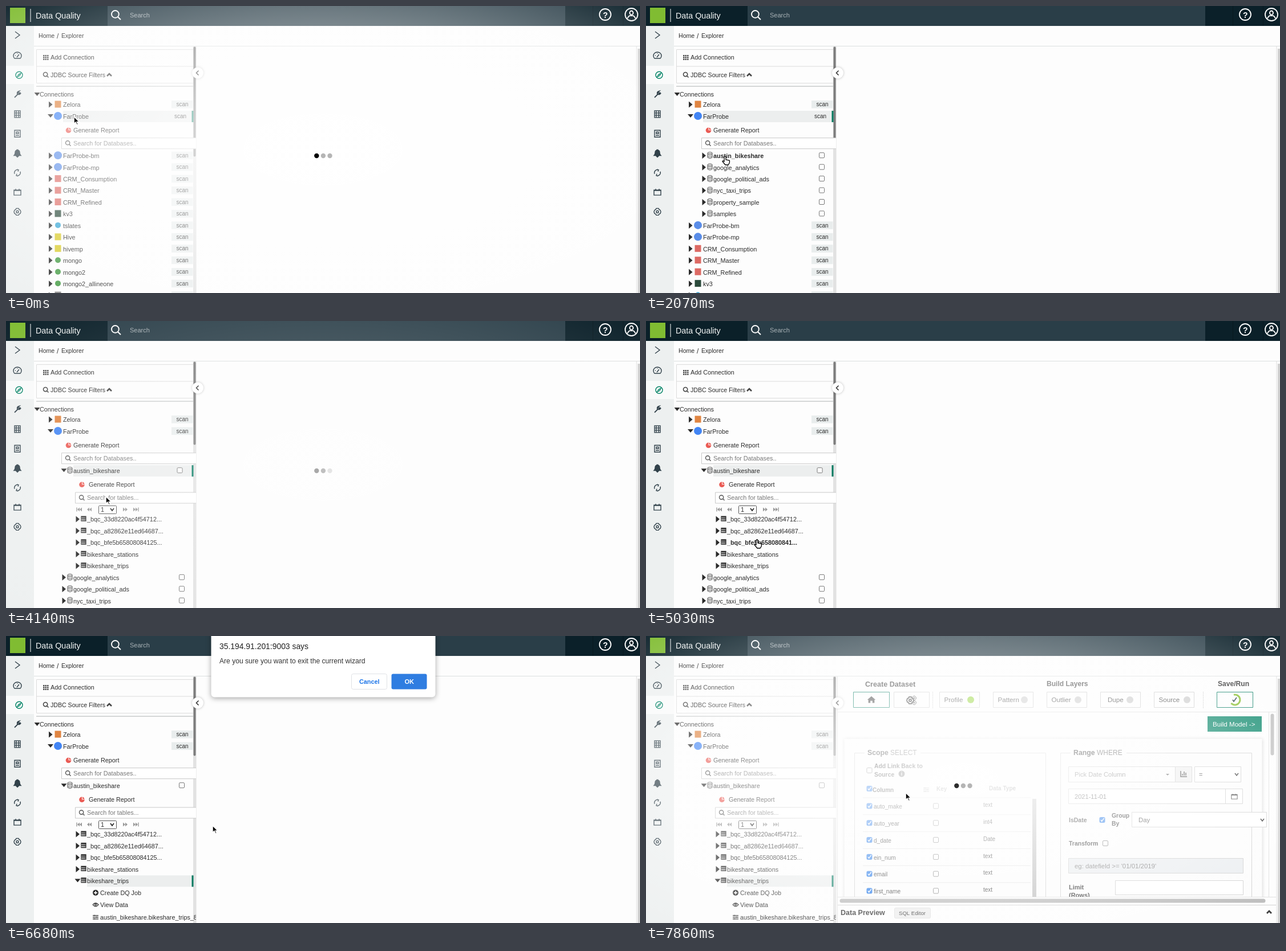
Write an HTML page with a canvas that moves like this. It is 1111x504 px and loops after 8 s.

```html
<!DOCTYPE html>
<html lang="en">
<head>
<meta charset="utf-8">
<title>Data Quality</title>
<style>
html, body { margin: 0; width: 100%; height: 100%; overflow: hidden; background: #fdfdfd; }
canvas { display: block; }
</style>
</head>
<body>
<canvas id="stage" width="1111" height="504"></canvas>
<script>
const g = document.getElementById('stage').getContext('2d');
const LOOP = 8000, TICK = 147.7, LAST = 53;
const FONT = '"Liberation Sans", Arial, sans-serif';
const INK = '#2b2b2b', GREEN = '#00795f', GREY = '#777';

// Moments of change, in ticks
const DBS = 3, OPEN_DB = 15, TABLES = 26, OPEN_TABLE = 39, ASK = 43, ASK_END = 52, WIZARD = 53;

const PATHS = {
  right: 'M-4-6L4 0L-4 6', left: 'M2-4L-2 0L2 4', up: 'M-4 2L0-2L4 2', down: 'M-3-2L0 2L3-2',
  search: 'M3-1A4 4 0 1 1-5-1A4 4 0 1 1 3-1M2 2L5 5',
  gauge: 'M-5 5A7 6.5 0 1 1 5 5ZM-1 3L3-2M-4 0H-3M0-4V-3',
  compass: 'M6 0A6 6 0 1 1-6 0A6 6 0 1 1 6 0M3-3L1 1L-3 3L-1-1Z',
  wrench: 'M-5 5L1-1M5-4L3-2L1-4L3-6Q-1-5 0-1Q4 1 6-3',
  grid: 'M-5-6H5V6H-5ZM-5-2H5M-5 2H5M-2-6V6M2-6V6',
  doc: 'M-5-6H5V6H-5ZM-2-3H2V0H-2ZM-3 3H3',
  bell: 'M-6 4Q-4 2-4-1Q-4-5-1-5V-6H1V-5Q4-5 4-1Q4 2 6 4ZM-2 5H2L0 7Z',
  refresh: 'M-5 2A5.5 5.5 0 0 1 2-5M-1-6L2-5L1-2M5-2A5.5 5.5 0 0 1-2 5M1 6L-2 5L-1 2',
  calendar: 'M-6-4H6V5H-6ZM-6-3H6M-3-6V-4M3-6V-4',
  gear: 'M2 0A2 2 0 1 1-2 0A2 2 0 1 1 2 0M-2-6H2L3-4L5-3L6 0L5 3L3 4L2 6H-2L-3 4L-5 3L-6 0L-5-3L-3-4Z',
  person: 'M3-2A3 3.5 0 1 1-3-2A3 3.5 0 1 1 3-2M-7 8Q-5 2 0 3Q5 2 7 8',
  db: 'M4-4A4 1.5 0 1 1-4-4A4 1.5 0 1 1 4-4V4Q0 7-4 4V-4M-4-1Q0 1 4-1M-4 2Q0 4 4 2',
  table: 'M-4-4H4V4H-4ZM-4-3H4M-4 0H4M-1-4V4M2-4V4',
  eye: 'M-5 0Q0-6 5 0Q0 6-5 0M1.5 0A1.5 1.5 0 1 1-1.5 0A1.5 1.5 0 1 1 1.5 0',
  sliders: 'M-5-3H5M-5 0H5M-5 3H5M-2-4V-2M2-1V1M-2 2V4',
  plus: 'M-3 0H3M0-3V3', tick: 'M-3 0L-1 3L4-4',
  home: 'M-8 0L0-7L8 0L6 0V6H2V2H-2V6H-6V0Z',
  chart: 'M-5-5V5H6M-2 3V0M1 3V-4M4 3V-2',
  arrow: 'M0 0V13L3 10L5.500 15L7.500 14L5.500 9.500H9.500Z',
  hand: 'M-1 0Q1-2 2 0V5L8 6Q9 7 8 11L6 14H1L-4 8Q-4 6-1 8Z',
};
for (const n in PATHS) PATHS[n] = new Path2D(PATHS[n]);

function icon(name, x, y, stroke = INK, width = 1.3, fill, scale = 1) {
  g.save();
  g.translate(x, y);
  g.scale(scale, scale);
  if (fill) { g.fillStyle = fill; g.fill(PATHS[name]); }
  if (stroke) { g.strokeStyle = stroke; g.lineWidth = width; g.stroke(PATHS[name]); }
  g.restore();
}
function rect(x, y, w, h, color) { g.fillStyle = color; g.fillRect(x, y, w, h); }
function frame(x, y, w, h, color, fill, r = 0) {
  g.beginPath();
  g.roundRect(x + .5, y + .5, w - 1, h - 1, r);
  if (fill) { g.fillStyle = fill; g.fill(); }
  if (color) { g.strokeStyle = color; g.lineWidth = 1; g.stroke(); }
}
function disc(x, y, r, fill, stroke, width = 1) {
  g.beginPath();
  g.arc(x, y, r, 0, 7);
  if (fill) { g.fillStyle = fill; g.fill(); }
  if (stroke) { g.strokeStyle = stroke; g.lineWidth = width; g.stroke(); }
}
function text(s, x, y, size = 10.8, color = INK, weight = '') {
  g.font = `${weight} ${size}px ${FONT}`;
  g.fillStyle = color;
  g.fillText(s, x, y + size * .36);
}
function poly(color, ...p) {
  g.fillStyle = color;
  g.beginPath();
  for (let i = 0; i < p.length; i += 2) g.lineTo(p[i], p[i + 1]);
  g.fill();
}
function check(x, y, on) {
  frame(x - 5, y - 5, 10, 10, on ? '#1a73e8' : GREY, on ? '#1a73e8' : '#fff', 1.5);
  if (on) icon('tick', x, y, '#fff', 1.8, null, .8);
}

const clamp = v => Math.max(0, Math.min(1, v));

// tick, x, y
const MOVES = [[0, 119, 194], [7, 119, 194], [14, 138, 265], [15, 138, 265], [22, 175, 308],
  [31, 175, 308], [34, 194, 385], [38, 176, 428], [39, 176, 428], [41, 205, 449], [42, 205, 449],
  [50, 701, 81], [51, 701, 81], [53, 455, 275]];
function pointer(k) {
  const i = Math.max(1, MOVES.findIndex(m => m[0] >= k));
  const [a, x, y] = MOVES[i - 1], [b, u, v] = MOVES[i];
  let f = (k - a) / (b - a);
  f = f * f * (3 - 2 * f);
  return [x + (u - x) * f, y + (v - y) * f];
}
function veil(k) {
  if (k < 15) return clamp((6 - k) / 3);
  if (k < 51) return clamp((29 - k) / 3);
  return [.2, .6, 1][k - 51];
}

const SOURCES = [
  ['FarProbe-bm', '#5a8de8', 7], ['FarProbe-mp', '#5a8de8', 7],
  ['CRM_Consumption', '#dd6a64'], ['CRM_Master', '#dd6a64'], ['CRM_Refined', '#dd6a64'],
  ['kv3', '#2b4a3b'], ['tslates', '#35a5d5', 5], ['Hive', '#d9cb2c'], ['hivemp', '#d9cb2c'],
  ['mongo', '#4b9f4b', 5], ['mongo2', '#4b9f4b', 5], ['mongo2_allineone', '#4b9f4b', 5], ['', '#888'],
];
const SCHEMAS = ['austin_bikeshare', 'google_analytics', 'google_political_ads', 'nyc_taxi_trips', 'property_sample', 'samples'];
const TABLE_NAMES = ['_bqc_33d8220ac4f54712...', '_bqc_a82862e11ed64687...', '_bqc_bfe5b65808084125...', 'bikeshare_stations', 'bikeshare_trips'];
const JOBS = [['plus', 'Create DQ Job', 21], ['eye', 'View Data', 22], ['sliders', 'austin_bikeshare.bikeshare_trips_8', 20]];

// Each row: kind, level, label, y, plus optional open / active / mark
function treeRows(k) {
  const rows = [];
  let y = 173.5;
  const add = (kind, level, label, step = 20.45, more) => { rows.push({ kind, level, label, y, ...more }); y += step; };
  add('source', 1, 'Zelora', 20.5, { mark: ['#e08542'] });
  add('source', 1, 'FarProbe', 24.3, { mark: ['#4285f4', 7], open: true, active: k < OPEN_DB });
  add('report', 2, 'Generate Report', 22.9);
  add('search', 2, 'Search for Databases..', 22);
  if (k >= DBS) SCHEMAS.forEach((name, i) => {
    const open = !i && k >= OPEN_DB;
    add('schema', 2, name, open ? 24.1 : 20.45, { open, active: open && k < OPEN_TABLE });
    if (!open) return;
    add('report', 3, 'Generate Report', k >= TABLES ? 23.2 : 20.3);
    if (k < TABLES) return;
    add('search', 3, 'Search for tables...', 20.5);
    add('pager', 3, '1', 17.6);
    TABLE_NAMES.forEach((t, j) => {
      const wide = j === 4 && k >= OPEN_TABLE;
      add('table', 3, t, 20.45, { open: wide, active: wide });
      if (wide) JOBS.forEach(([mark, label, step]) => add('job', 4, label, step, { mark }));
    });
  });
  for (const [name, ...mark] of SOURCES) add('source', 1, name, 20.45, { mark });
  return rows.filter(r => r.y < 516);
}

function twisty(x, y, open) {
  if (open) poly(INK, x - 2, y - 4, x + 8, y - 4, x + 3, y + 2);
  else poly(INK, x, y - 6, x + 6.5, y - .5, x, y + 5);
}
function drawRow(r, hover) {
  const { kind, level, label, y } = r, tx = [59, 100, 118, 142, 165][level];
  if (kind === 'report') {
    const x = level === 2 ? 109.5 : 133;
    disc(x, y, 4.8, '#ea5b54');
    poly('#fff', x, y, x, y - 5, x + 1, y - 5, x + 1, y - 1, x + 5, y - 1, x + 5, y);
    return text(label, level === 2 ? 118 : 145, y, 10.8);
  }
  if (kind === 'search') {
    frame(tx - 21, y - 10, 240, 20, '#c8c8c8', '#fff');
    icon('search', tx - 9, y, '#555', 1.6, null, .9);
    return text(label, tx, y, 10.8, GREY);
  }
  if (kind === 'pager') {
    [[129, -1, 1], [146, -1], [209, 1], [227, 1, 1]].forEach(([x, s, bar]) => {
      for (const d of [-4, 0]) {
        const a = x + (s < 0 ? d + 4 : d);
        poly('#999', a, y - 3.5, a + s * 4, y, a, y + 3.5);
      }
      if (bar) rect(x + s * 5 - .7, y - 3.5, 1.4, 7, '#999');
    });
    frame(162, y - 7, 32, 15, '#555', '#fff', 1);
    text(label, 166, y + .5);
    return icon('down', 186, y, INK, 1.8);
  }
  if (kind === 'job') {
    if (r.mark === 'plus') { disc(157, y, 5, INK); icon('plus', 157, y, '#fff', 1.6); }
    else icon(r.mark, 157, y, INK, 1.2);
    return text(label, tx, y);
  }
  if (r.active) {
    rect(tx, y - 10, 327 - tx, 20, '#eceeee');
    rect(325.5, y - 10, 3, 20, GREEN);
  }
  twisty([0, 75, 98.500, 122.500][level], y, r.open);
  if (kind === 'source') {
    const [color, radius] = r.mark;
    if (radius) disc(91, y - 1, radius, color); else rect(85.5, y - 7, 11, 12, color);
    if (!r.active) rect(290, y - 7.500, 37.5, 13.500, '#e9eded');
    text('scan', r.active ? 295 : 298.5, y - 1, 10);
  } else if (kind === 'schema') {
    icon('db', 112, y - 1, '#555', 1);
    check(r.active ? 304.5 : 308, y - 1);
  } else icon('table', 136, y - 1.5, INK, 1.3);
  const name = hover && label.endsWith('...') ? label.slice(0, -5) + '...' : label;
  text(name, tx, y, 10.8, INK, hover ? 'bold' : '');
}

function drawChrome() {
  rect(0, 0, 1111, 504, '#fdfdfd');
  rect(0, 35, 49, 469, '#edf0f0');
  rect(0, 105, 49, 32, '#f9fafa');
  ['right', 'gauge', 'compass', 'wrench', 'grid', 'doc', 'bell', 'refresh', 'calendar', 'gear'].forEach((n, i) =>
    icon(n, i === 2 ? 23 : 20, i ? 87 + (i - 1) * 34.3 : 51, n === 'compass' ? '#008264' : '#31414a',
      n === 'wrench' ? 2 : 1.4, n === 'bell' ? '#31414a' : null));
  rect(0, 0, 1111, 35, '#0b2029');
  rect(7, 3, 27, 27, '#80bc32');
  rect(42.5, 5, 1, 23, '#fff');
  text('Data Quality', 52, 16.5, 14.3, '#f4f6f6');
  rect(178, 0, 802, 35, '#2a3e48');
  icon('search', 193, 16, '#fff', 1.2, null, 1.6);
  text('Search', 217, 16.5, 11, '#a9b2b6');
  rect(1028, 0, 1, 35, '#081820');
  rect(1081, 0, 1, 35, '#081820');
  disc(1050, 15, 10, null, '#fff', 1.8);
  text('?', 1046, 15.5, 14, '#fff', 'bold');
  disc(1096, 15, 11, null, '#fff', 1.8);
  icon('person', 1096, 14, '#fff', 1.8);
  text('Home', 57, 52.5, 10.6);
  text('/', 89, 52.5, 12);
  text('Explorer', 97, 52.5, 10.6);
  rect(49, 70, 1062, 1, '#dcdfdf');
}

function drawTree(k, hover) {
  g.save();
  g.beginPath();
  g.rect(49, 71, 285, 433);
  g.clip();
  frame(53, 76, 280, 60, '#dcdcdc');
  rect(53, 105.5, 275, 1, '#dcdcdc');
  for (let i = 0; i < 9; i++) rect(65 + i % 3 * 3.5, 86 + (i / 3 | 0) * 3.3, 2.500, 2.300, '#444');
  text('Add Connection', 78, 90.5);
  icon('search', 70, 121, '#444', 1.8, null, .9);
  text('JDBC Source Filters', 78, 121, 10.6);
  icon('up', 181, 121, '#444', 2.5);
  rect(53, 140, 275, 2, '#d5d7d7');
  twisty(51.500, 156, true);
  text('Connections', 59, 155.5);
  rect(328, 71, 5, 433, '#e2e2e2');
  const end = k < DBS ? 265 : k < TABLES ? 238 : k < OPEN_TABLE ? 218 : 211;
  frame(328, 71, 5, end - 71, null, '#7d7d7d', 2);
  for (const r of treeRows(k)) drawRow(r, r === hover || (hover && r.y === hover.y));
  g.restore();
}

function drawPanel() {
  rect(333, 71, 1, 433, '#eee');
  rect(1104.5, 71, 1, 433, '#ddd');
  rect(1107, 75, 4, 429, '#d0d0d0');
}
function drawHandle() {
  g.save();
  g.shadowColor = 'rgba(0,0,0,.25)';
  g.shadowBlur = 4;
  disc(336, 117.5, 10, '#fff');
  g.restore();
  icon('left', 335.5, 117.5, INK, 1.5);
}

function drawWizard() {
  rect(334, 71, 770, 433, '#fdfdfd');
  rect(335, 71, 1, 433, '#ddd');
  text('Create Dataset', 384, 84, 12.6, '#444', 'bold');
  text('Build Layers', 702, 84, 12.1, '#444', 'bold');
  text('Save/Run', 1002, 84, 12.1, INK, 'bold');
  frame(363, 98, 64, 28, GREEN);
  icon('home', 395, 112, null, 0, '#444', .9);
  frame(434, 98, 63, 28, '#ccc');
  icon('gear', 463, 113, '#444', 2);
  icon('gear', 470, 109, '#444', 1.5, null, .6);
  icon('gear', 470, 117, '#444', 1.5, null, .6);
  ['Profile', 'Pattern', 'Outlier', 'Dupe', 'Source'].forEach((s, i) => {
    const x = 514 + i * 94;
    frame(x, 98, 71, 28, '#ccc');
    text(s, x + (i === 3 ? 13 : 8.5), 112, 11.6, '#444');
    disc(x + (i === 3 ? 52 : i > 3 ? 58 : 55), 112, 6, i ? '#ccc' : '#8fd32e');
  });
  for (const x of [502, 976]) for (let y = 98; y < 127; y += 3) rect(x, y, 1, 1.5, '#bbb');
  frame(1000, 98, 64, 28, GREEN);
  g.beginPath(); g.arc(1032, 112, 9, -1.8, 2.4); g.strokeStyle = '#83bd27'; g.lineWidth = 3; g.stroke();
  icon('tick', 1031, 112, '#1e3640', 1.8);
  rect(336, 133, 768, 1, '#ddd');

  g.save();
  g.beginPath();
  g.rect(336, 134, 756, 325);
  g.clip();
  g.shadowColor = 'rgba(0,0,0,.2)';
  g.shadowBlur = 6;
  frame(347, 180, 733, 340, null, '#fcfcfc');
  g.shadowBlur = 0;
  rect(984, 141, 95, 27, '#008264');
  text('Build Model ->', 993, 155, 11.6, '#fff');
  for (const [x, title, word, w] of [[365, 'Scope', 'SELECT', 40], [726, 'Range', 'WHERE', 41]]) {
    frame(x, 205, 336, 300, '#ccc');
    rect(x + 18, 200, 98, 10, '#fcfcfc');
    text(title, x + 23, 205, 12.3, INK, 'bold');
    text(word, x + 23 + w, 205, 12, '#555');
  }
  check(391.5, 236);
  text('Add Link Back to', 400, 228, 10.4, INK, 'bold');
  text('Source', 400, 243, 10.4, INK, 'bold');
  disc(448, 242, 5.5, '#555');
  text('i', 446.7, 242, 9, '#fff', 'bold');
  check(391.5, 268, true);
  text('Column', 397, 270, 10, INK, 'bold');
  icon('sliders', 491, 270, '#888', 1);
  text('Key', 509, 268, 10, GREY, 'bold');
  text('Data Type', 601, 267, 10, GREY, 'bold');
  [['auto_make', 'text'], ['auto_year', 'int4'], ['d_date', 'Date'], ['ein_num', 'text'], ['email', 'text'], ['first_name', 'text']]
    .forEach(([name, type], i) => {
      const y = 298.5 + i * 29.8;
      rect(380, y - 15, 294, 1, '#ddd');
      check(391.5, y, true);
      text(name, 399, y + 1, 10.1);
      check(508, y);
      text(type, 591, y - 2, 10);
    });
  rect(677, 286, 7, 173, '#bbb');

  frame(740, 229, 188, 28, '#ccc');
  text('Pick Date Column', 751, 243, 11.2, GREY);
  poly('#666', 911, 242, 917, 242, 914, 245);
  frame(927, 229, 30, 28, '#ccc', '#eee');
  icon('chart', 942, 242, '#444', 1.5);
  frame(961, 229, 82, 28, '#ccc', '#fff');
  text('=', 969, 243, 11);
  icon('down', 1035, 243, INK, 1.6);
  frame(740, 268, 306, 27, '#ccc', '#fff');
  rect(1015, 268, 1, 27, '#ccc');
  text('2021-11-01', 751, 282, 11.1, '#555');
  icon('calendar', 1031, 282, '#444', 1.3, null, .85);
  text('IsDate', 741, 323, 10.5, INK, 'bold');
  check(799.5, 323, true);
  text('Group', 816, 315, 10.4, INK, 'bold');
  text('By', 816, 329, 10.4, INK, 'bold');
  frame(851, 309, 237, 27, '#ccc', '#fff');
  text('Day', 863, 323, 11.3, '#444');
  icon('down', 1080, 323, INK, 1.6);
  text('Transform', 741, 364, 10.5, INK, 'bold');
  check(805, 364);
  frame(740, 390, 307, 27, '#ccc', '#e9ecef');
  text("eg: datefield >= '01/01/2019'", 751, 404, 11.4, GREY);
  text('Limit', 741, 441, 11, INK, 'bold');
  text('(Rows)', 741, 455, 11, INK, 'bold');
  frame(822, 429, 225, 26, '#ccc', '#fff');
  g.restore();

  rect(1091, 134, 1, 325, '#ddd');
  frame(1094, 136, 7, 74, null, '#bbb', 3);
  rect(336, 458, 768, 1, '#ddd');
  frame(339, 461, 747, 8, null, '#b5b5b5', 4);
  rect(336, 472, 768, 1, '#ccc');
  text('Data Preview', 341, 485.5, 12.5, INK, 'bold');
  frame(435, 477, 64, 19, '#ddd', '#ececec', 2);
  text('SQL Editor', 443, 487, 9.6);
  icon('up', 1092, 485, INK, 2.8);
}

function drawVeil(k) {
  const a = veil(k);
  if (!a) return;
  g.save();
  g.globalAlpha = a;
  g.translate(555.5, 252);
  g.scale(785, 356);
  const fog = g.createRadialGradient(0, 0, 0, 0, 0, 1);
  fog.addColorStop(0, 'rgba(255,255,255,.9)');
  fog.addColorStop(1, 'rgba(255,255,255,.05)');
  g.fillStyle = fog;
  g.fillRect(-1, -1, 2, 2);
  g.restore();
  const age = k - (k < 15 ? -2 : k < 51 ? 15 : 51.8);
  if (age < 0) return;
  g.save();
  g.globalAlpha = a;
  for (let i = 0; i < 3; i++) {
    const v = 181 * (1 - clamp((age % 9 - 3 * i) / 1.6));
    disc(544.3 + i * 11.6, 263, 4.2, `rgb(${v},${v},${v})`);
  }
  g.restore();
}

function drawDialog() {
  g.save();
  g.shadowColor = 'rgba(0,0,0,.35)';
  g.shadowBlur = 10;
  g.shadowOffsetY = 2;
  frame(359, -10, 394, 118, null, '#fff', 6);
  g.restore();
  text('35.194.91.201:9003 says', 374, 18, 13.9, '#222');
  text('Are you sure you want to exit the current wizard', 374, 44, 12.1, '#333');
  frame(605, 66, 63, 28, '#dfe1e5', '#fff', 3);
  text('Cancel', 619, 80, 10.8, '#1a73e8', 'bold');
  frame(675, 66, 63, 28, null, '#2f7de1', 3);
  text('OK', 698.5, 80, 11, '#fff', 'bold');
}

function draw(k) {
  const [x, y] = pointer(k), asking = k >= ASK && k < ASK_END;
  const free = !veil(k) && k < ASK;
  const hover = free && treeRows(k).find(r => Math.abs(r.y - y) < 10.2 && /source|schema|table|job/.test(r.kind));
  drawChrome();
  drawTree(k, hover);
  drawPanel();
  if (k >= WIZARD) drawWizard();
  drawHandle();
  drawVeil(k);
  if (asking) drawDialog();
  if (hover) icon('hand', x, y, '#000', 1.3, '#fff');
  else icon('arrow', x, y, '#fff', 1.6, '#000');
}

function loop(now) {
  draw(Math.min(LAST, Math.floor(now % LOOP / TICK)));
  requestAnimationFrame(loop);
}
draw(0);
requestAnimationFrame(loop);
</script>
</body>
</html>
```
